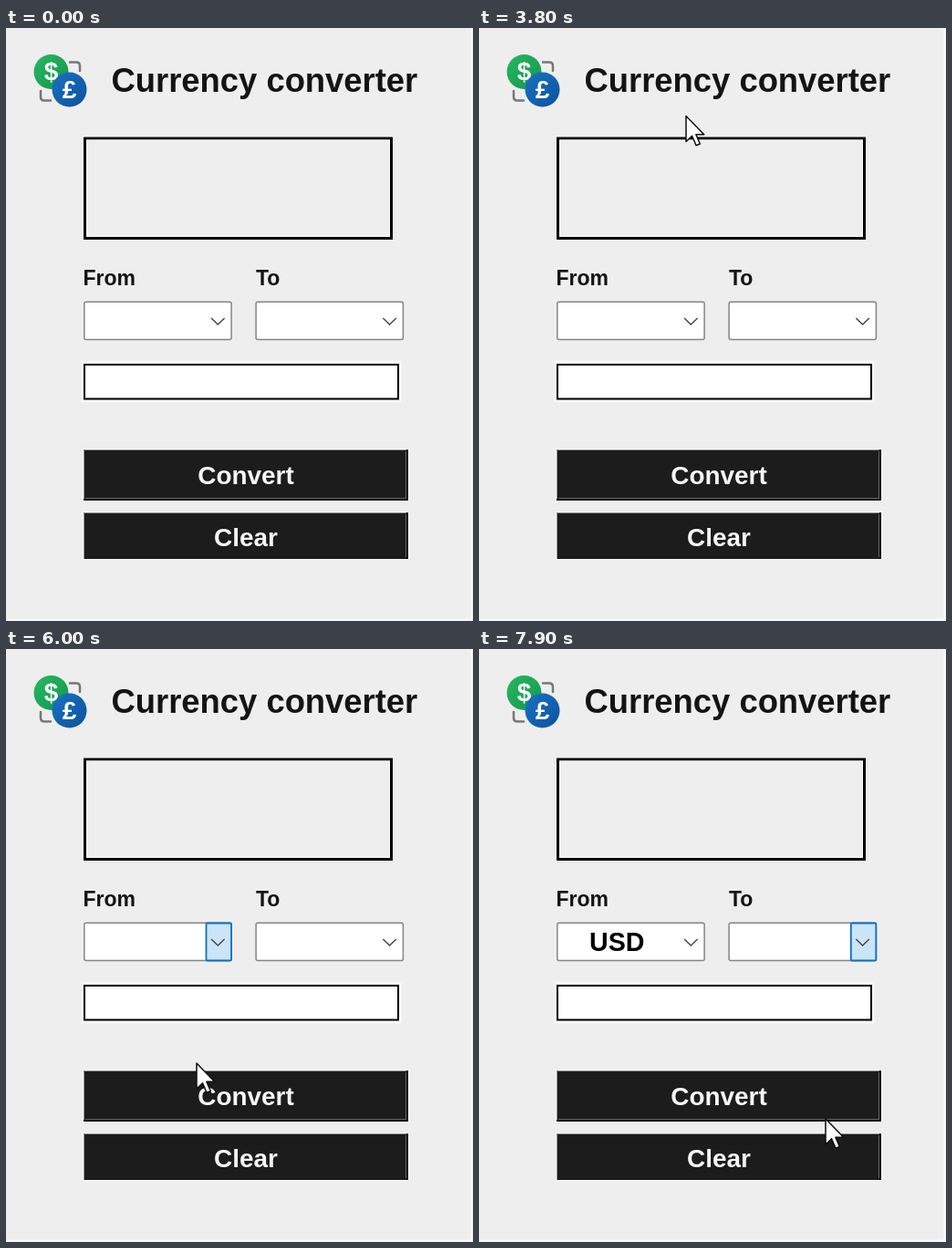
Animation, 512 px wide and 650 px high, one loop 8 s. Source, as an HTML page:

```html
<!DOCTYPE html>
<html lang="en">
<head>
<meta charset="utf-8">
<title>Currency converter</title>
<style>
  html, body { margin: 0; width: 100%; height: 100%; overflow: hidden; background: #eee; }
  svg { display: block; width: 512px; height: 650px; }
  text { font-family: "Liberation Sans", Arial, sans-serif; font-weight: bold; fill: #141414; }
  .label { font-size: 23px; }
  .caption { font-size: 27.9px; fill: #f6f6f6; text-anchor: middle; }
  .value { font-size: 28.6px; fill: #000; text-anchor: middle; }
  .sign { font-size: 28px; fill: #fff; text-anchor: middle; }
  .line { fill: none; stroke: #777; stroke-width: 2.5; stroke-linecap: round; }
  .chevron { fill: none; stroke: #444; stroke-width: 1.4; }
</style>
</head>
<body>
<svg viewBox="0 0 512 650">
  <defs>
    <linearGradient id="green" x2="1" y2="1"><stop stop-color="#27b862"/><stop offset="1" stop-color="#14964c"/></linearGradient>
    <linearGradient id="blue" x2="1" y2="1"><stop stop-color="#1a72c2"/><stop offset="1" stop-color="#0d529c"/></linearGradient>
  </defs>
  <rect width="512" height="650" fill="#eee"/>
  <path d="M510.5 0V648.5H0" fill="none" stroke="#fafafa" stroke-width="2"/>

  <path class="line" d="M70 37.500H77Q81 37.500 81 41.500V47M38 69V75.500Q38 79.500 42 79.500H49"/>
  <circle cx="49.500" cy="48" r="19" fill="url(#green)"/>
  <text class="sign" x="49.500" y="57">$</text>
  <circle cx="69.500" cy="67.500" r="19" fill="url(#blue)"/>
  <text class="sign" x="69.500" y="77">£</text>
  <text x="115.500" y="70" font-size="36.400">Currency converter</text>

  <rect x="84" y="118.500" width="341" height="114.500" fill="#f8f8f8"/>
  <rect x="86.500" y="121" width="336" height="109.500" fill="#eee" stroke="#000" stroke-width="3"/>
  <rect x="88.500" y="123" width="332" height="105.500" fill="none" stroke="#f8f8f8"/>
  <text class="label" x="84.500" y="282">From</text>
  <text class="label" x="274" y="282">To</text>
  <g id="combos"></g>
  <rect x="83.500" y="365.500" width="349" height="44" fill="none" stroke="#f8f8f8" stroke-width="2"/>
  <rect x="86" y="369" width="344" height="37.500" fill="#fff" stroke="#000" stroke-width="2"/>

  <g id="buttons"></g>
  <path id="cursor" d="M0 0V16.500L3.900 12.900L6.500 19L9 17.900L6.400 11.900H11.600Z"
        fill="#fff" stroke="#111" stroke-width=".9" stroke-linejoin="round"/>
</svg>
<script>
const LOOP = 8000, STEP = 100;
const find = id => document.getElementById(id);

// Each entry: time, x, y of the pointer tip
const path = [
  [3700, 230, 46], [3800, 227, 96.5], [3900, 226, 205], [4000, 228, 309],
  [4300, 230, 318], [4600, 254, 440], [4700, 270, 455], [4900, 283, 394],
  [5200, 234, 320], [5400, 231, 321], [5700, 212, 446], [6000, 209, 454],
  [6200, 209, 455], [6400, 412, 318], [6500, 421, 316], [6700, 505, 396],
  [7000, 510.3, 404], [7100, 500, 415], [7400, 421, 320], [7600, 411, 341],
  [7900, 380, 515]
];

// Each entry: start time, button state, whole border lit
const fromStates = [
  [0, "idle"], [4000, "hover"], [5200, "down", true], [5400, "down"],
  [6200, "idle", true], [6500, "idle"]
];
const toStates = [
  [0, "idle"], [6400, "hover"], [6500, "down"], [6800, "down", true], [7400, "down"]
];
const fills = { idle: "none", hover: "#e5f1fb", down: "#cce4f7" };
const edges = { idle: "none", hover: "#0a80d8", down: "#0a70c4" };

function makeCombo(x, states) {
  const group = document.createElementNS("http://www.w3.org/2000/svg", "g");
  group.innerHTML = `
    <rect x="${x + .8}" y="300.300" width="161.300" height="41.300" rx="2" fill="#fff" stroke-width="1.500"/>
    <rect x="${x + 134.5}" y="300.500" width="27.500" height="41" rx="1" stroke-width="1.800"/>
    <path class="chevron" d="M${x + 140} 318l7.300 7l7.300 -7"/>`;
  find("combos").append(group);
  const [frame, button] = group.children;
  return t => {
    const [, state, lit] = states.findLast(s => s[0] <= t);
    frame.setAttribute("stroke", lit ? "#1a7fd0" : "#858585");
    button.setAttribute("fill", fills[state]);
    button.setAttribute("stroke", edges[state]);
  };
}

function makeButton(y, height, caption, base) {
  const bottom = y + height;
  find("buttons").insertAdjacentHTML("beforeend", `
    <rect x="84" y="${y - 1}" width="358" height="${height + 2}" fill="#f8f8f8"/>
    <rect x="85" y="${y}" width="356" height="${height}" fill="#1c1c1c"/>
    <path d="M85.500 ${bottom}V${y + .5}H439" fill="none" stroke="#909090"/>
    <path d="M440 ${y}V${bottom}" stroke="#000" stroke-width="2"/>
    <path d="M438.500 ${y + 2}V${bottom - 2}" stroke="#666"/>
    <text class="caption" x="263" y="${base}">${caption}</text>`);
}

const combos = [makeCombo(85, fromStates), makeCombo(273.3, toStates)];
makeButton(462, 56, "Convert", 499.5);
makeButton(531, 51, "Clear", 568);
find("buttons").insertAdjacentHTML("beforeend",
  '<path d="M87 515.500H438" stroke="#666"/><path d="M85 517H441" stroke="#000" stroke-width="2"/>');
find("combos").insertAdjacentHTML("beforeend", `
  <text id="chosen" class="value" x="151.300" y="330.500">USD</text>
  <rect id="caret" x="340" y="304" width="2" height="33"/>`);

const show = (id, on) => find(id).setAttribute("visibility", on ? "visible" : "hidden");

function pointerAt(t) {
  const i = path.findLastIndex(p => p[0] <= t);
  const a = path[i], b = path[i + 1] || a;
  const k = a === b ? 0 : (t - a[0]) / (b[0] - a[0]);
  return [a[1] + (b[1] - a[1]) * k, a[2] + (b[2] - a[2]) * k];
}

function draw(now) {
  const t = Math.floor(now % LOOP / STEP) * STEP;
  combos.forEach(update => update(t));
  show("chosen", t >= 6200);
  show("caret", t >= 6800 && t < 7400);
  const visible = t >= path[0][0];
  show("cursor", visible);
  if (visible) find("cursor").setAttribute("transform", `translate(${pointerAt(t)}) scale(1.7)`);
}

const start = performance.now();
function tick() {
  draw(performance.now() - start);
  requestAnimationFrame(tick);
}
tick();
</script>
</body>
</html>
```
